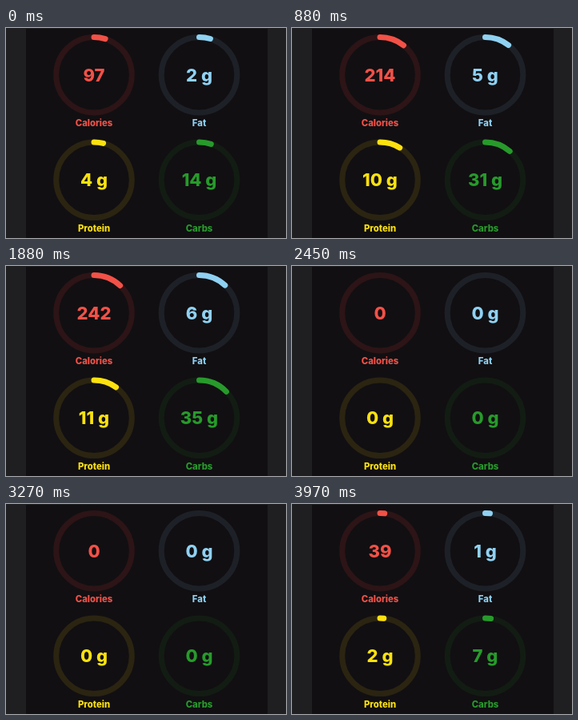
An HTML page that plays this animation: 350 px wide and 263 px high, repeating every 4 s.

```html
<!DOCTYPE html>
<html lang="en">
<head>
<meta charset="utf-8">
<title>Nutrition rings</title>
<style>
  html, body { margin: 0; width: 100%; height: 100%; overflow: hidden; background: #1f1e20; }
  svg { display: block; width: 350px; height: 263px; }
  text { font-family: Inter, sans-serif; font-weight: 800; text-anchor: middle; }
  .value { font-size: 22px; }
  .label { font-size: 11.3px; }
  circle { fill: none; stroke-width: 7; }
</style>
</head>
<body>
<svg id="stage" viewBox="0 0 350 263">
  <rect x="25" y="1" width="302" height="262" fill="#110f12"/>
</svg>
<script>
const LOOP = 4000, RESET = 2310, RESTART = 3860, LAST = 3970;

// sweep: final arc in degrees; lead: fraction reached just before the loop restarts
const rings = [
  { label: 'Calories', x: 110, y: 58.7, color: '#f25147', track: '#2d1416', total: 242, unit: '', sweep: 43.6, lead: .161 },
  { label: 'Fat', x: 241.5, y: 58.7, color: '#8fd1f2', track: '#1d2127', total: 6, unit: ' g', sweep: 43, lead: .17 },
  { label: 'Protein', x: 110, y: 190.3, color: '#fde10f', track: '#2a2411', total: 11, unit: ' g', sweep: 35.6, lead: .165 },
  { label: 'Carbs', x: 241.5, y: 190.3, color: '#279a2b', track: '#121c13', total: 35, unit: ' g', sweep: 45.8, lead: .19 }
];

const stage = document.getElementById('stage');

function add(tag, attrs) {
  const node = document.createElementNS('http://www.w3.org/2000/svg', tag);
  for (const key in attrs) node.setAttribute(key, attrs[key]);
  return stage.appendChild(node);
}

for (const ring of rings) {
  const { x, y, color } = ring;
  const circle = { cx: x, cy: y, r: 47.3 };
  add('circle', { ...circle, stroke: ring.track });
  ring.arc = add('circle', {
    ...circle, stroke: color, pathLength: 360,
    'stroke-linecap': 'round', transform: `rotate(-90 ${x} ${y})`
  });
  ring.value = add('text', { x, y: y + 8.1, fill: color, class: 'value' });
  add('text', { x, y: y + 64.6, fill: color, class: 'label' }).textContent = ring.label;
}

function progress(t, lead) {
  if (t >= RESTART) return lead * Math.min(1, (t - RESTART) / (LAST - RESTART));
  if (t >= RESET) return 0;
  const x = Math.min(1, (t + 1072) / 2480);
  return x * x * (3 - 2 * x);
}

function draw(t) {
  for (const ring of rings) {
    const p = progress(t, ring.lead);
    ring.arc.setAttribute('visibility', p > 0 ? 'visible' : 'hidden');
    ring.arc.setAttribute('stroke-dasharray', `${ring.sweep * p} 360`);
    ring.value.textContent = Math.round(ring.total * p) + ring.unit;
  }
}

const start = performance.now();
function frame() {
  draw((performance.now() - start) % LOOP);
  requestAnimationFrame(frame);
}
frame();
</script>
</body>
</html>
```
